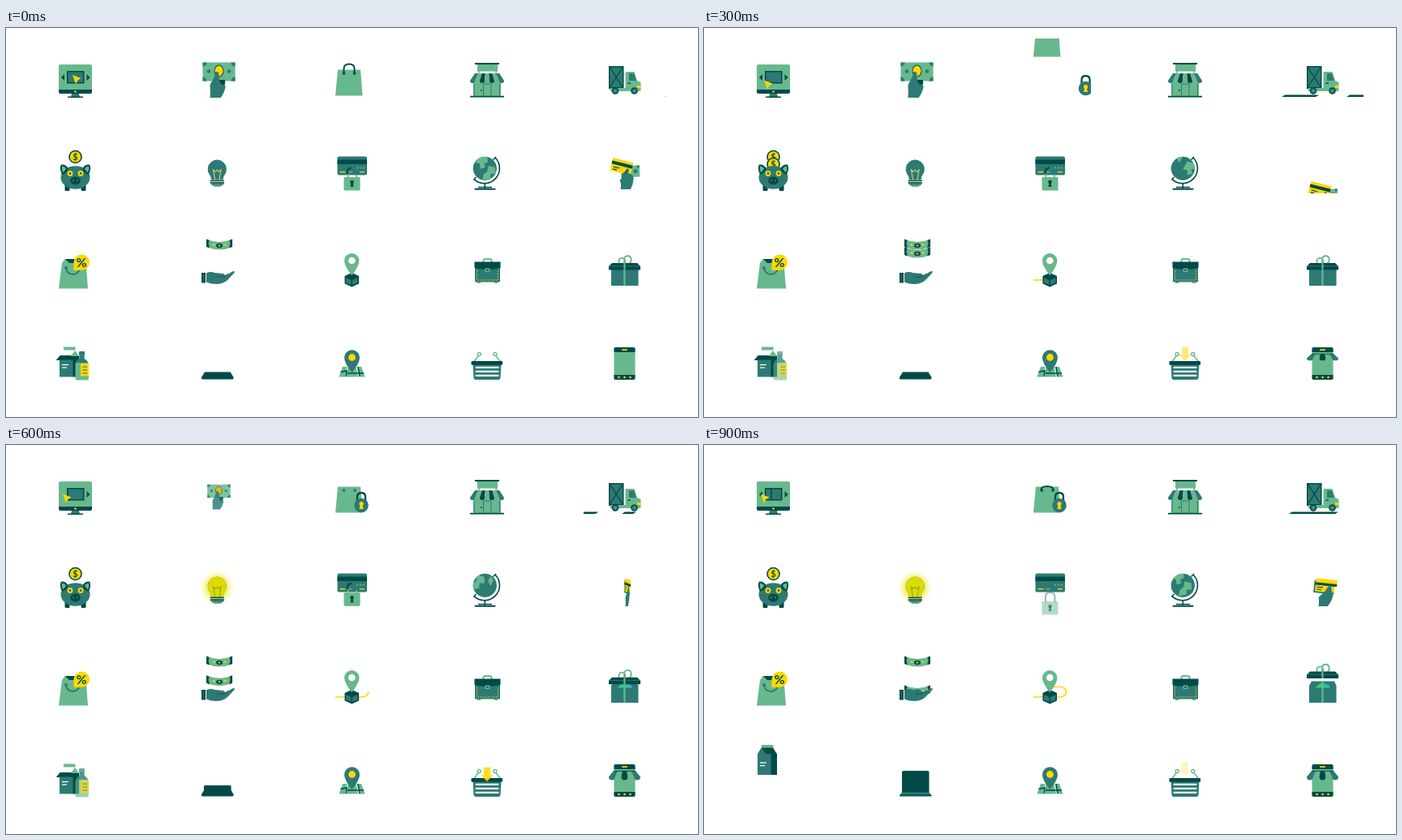
An HTML page with a canvas for the animation above (0.96 s loop, 853x480 px).

```html
<!DOCTYPE html>
<html>
<head>
<meta charset="utf-8">
<style>
html, body { margin: 0; width: 100%; height: 100%; overflow: hidden; background: #fff; }
canvas { display: block; }
</style>
</head>
<body>
<canvas id="stage" width="853" height="480"></canvas>
<script>
const c = document.getElementById('stage').getContext('2d');
const GREEN = '#68b88d', TEAL = '#2d7a74', DARK = '#004a48', YELLOW = '#ffd800', WHITE = '#fff';
const LOOP = 960, STEP = 60;
let t = 0;

// Piecewise linear value from time, value pairs
function key(...p) {
  if (t <= p[0]) return p[1];
  for (let i = 2; i < p.length; i += 2)
    if (t <= p[i]) return p[i - 1] + (p[i + 1] - p[i - 1]) * (t - p[i - 2]) / (p[i] - p[i - 2]);
  return p[p.length - 1];
}
function fill(color, d) { c.fillStyle = color; c.fill(new Path2D(d)); }
function line(color, w, d) { c.strokeStyle = color; c.lineWidth = w; c.stroke(new Path2D(d)); }
function rect(color, x, y, w, h, r = 0) {
  c.fillStyle = color;
  c.beginPath();
  c.roundRect(x, y, w, h, r);
  c.fill();
}
function oval(color, x, y, rx, ry = rx) {
  c.fillStyle = color;
  c.beginPath();
  c.ellipse(x, y, rx, ry, 0, 0, 7);
  c.fill();
}
function text(s, x, y, size, family) {
  c.font = `bold ${size}px ${family}, sans-serif`;
  c.textAlign = 'center';
  c.textBaseline = 'middle';
  c.fillStyle = DARK;
  c.fillText(s, x, y);
}
function group(draw, { dx = 0, dy = 0, alpha = 1, ox = 0, oy = 0, sx = 1, sy = 1, rot = 0 } = {}) {
  c.save();
  c.globalAlpha *= alpha;
  c.translate(ox + dx, oy + dy);
  c.rotate(rot);
  c.scale(sx, sy);
  c.translate(-ox, -oy);
  draw();
  c.restore();
}
function clipped(x, y, w, h, draw) {
  c.save();
  c.beginPath();
  c.rect(x, y, w, h);
  c.clip();
  draw();
  c.restore();
}

function monitor() {
  rect(GREEN, 65, 45, 41, 33, [2, 2, 0, 0]);
  rect(DARK, 65, 76, 41, 5, [0, 0, 2, 2]);
  oval(YELLOW, 85.5, 78.5, 1.2);
  fill(TEAL, 'M81 81H90L91 85H80Z');
  rect(DARK, 76, 84.5, 19, 1.5);
  rect(DARK, 75, 53, 21.5, 15.5);
  rect(TEAL, 76.5, 54.5, 18.5, 12.5);
  if (t >= 840) rect(DARK, key(840, 92, 900, 82), 54, 1.5, 13);
  if (t < 480 || t > 600) fill(DARK, 'M72 57V65L68 61Z');
  fill(DARK, 'M99.5 57V65L103.5 61Z');
  group(() => fill(YELLOW, 'M82 58L92.5 62L88.5 64.5L86 69Z'), {
    dx: key(0, 0, 120, 0, 300, -8, 420, -12, 900, -12),
    dy: key(0, 0, 120, 6.5, 300, 6.5, 420, 2.5)
  });
}

function payHand() {
  const s = key(480, 1, 540, .85, 720, .43, 840, 0);
  if (!s) return;
  group(() => {
    rect(GREEN, 242.5, 42.5, 40, 23);
    fill(TEAL, 'M242.5 42.5h5a5 5 0 0 1-5 5zM282.5 42.5v5a5 5 0 0 1-5-5zM242.5 65.5v-5a5 5 0 0 1 5 5zM282.5 65.5h-5a5 5 0 0 1 5-5z');
    oval(TEAL, 250, 53.5, 2.3);
    oval(TEAL, 275, 53.5, 2.3);
    oval(DARK, 262.5, 53, 6, 7.5);
    oval(YELLOW, 262.5, 53, 5, 6.5);
    fill(DARK, 'M261 64H270V69Q269 72 265 71Z');
    fill(TEAL, 'M257.5 58Q257 54 260 54Q262.5 54 262.5 58L263 65Q265 71 269 70Q271.5 71 270 75Q268 82 264.5 86H251.5Q252 78 251.5 73Q251 69 254.5 65Z');
  }, { ox: 262, oy: 64, sx: s, sy: s, alpha: key(540, 1, 720, .5) });
}

function lockedBag() {
  clipped(406, 13, 71, 72, () => {
    if (t < 240 || t >= 300) group(() => {
      fill(GREEN, 'M409 51.5H437L439.5 83.5H406Z');
      if (t >= 360) { oval(TEAL, 416.5, 56, 2); oval(TEAL, 430, 56, 2); }
    }, { dy: t < 240 ? 0 : key(300, -48, 420, -14, 540, 0) });
    if (t < 240) {
      line(DARK, 2, 'M416.5 57V50Q416.5 44.5 423 44.5Q429.5 44.5 429.5 50V57');
      oval(DARK, 416.5, 56, 1.8);
      oval(DARK, 429.5, 56, 1.8);
    }
    if (t >= 840) line(DARK, 2, 'M416 57Q414 51 423 51Q432 51 430 57');
    if (t >= 240) group(() => {
      line(DARK, 2.3, 'M433 71V64Q433 59 438 59Q443 59 443 64V71');
      oval(TEAL, 438, 74.5, 8.8);
      oval(YELLOW, 438, 72.5, 2.6);
      fill(YELLOW, 'M437 72H439L440.5 79H435.5Z');
    }, { dx: key(240, 45, 300, 32.5, 420, 9, 540, 0) });
  });
}

function store() {
  rect(DARK, 578, 43, 30, 2);
  rect(GREEN, 581, 45, 25, 8.5);
  line(TEAL, 1, 'M583 53V57M604 53V57');
  rect(GREEN, 576, 63, 34, 21);
  for (let i = 0; i < 7; i++) {
    const top = 578 + i * 4.3, low = 572 + i * 6;
    fill(i % 2 ? GREEN : i === 2 || i === 4 ? DARK : TEAL,
      `M${top} 56h4.3L${low + 6} 65a3 3 0 0 1-6 0Z`);
  }
  line(TEAL, 1, 'M588.5 84V69H598V84M577 69V83M608.5 69V83');
  oval(DARK, 586, 77, 1);
  rect(DARK, 572, 83.8, 42, 1.6);
}

function truck() {
  clipped(712, 40, 101, 46, () => {
    const road = (t0, x0, speed, len) => {
      const x = x0 - (t - t0) * speed;
      fill(DARK, `M${x} 84.9L${x + 4} 82.6H${x + len}L${x + len - 4} 84.9Z`);
    };
    road(120, 772, .333, 46);
    road(300, 792, .302, 29);
    road(540, 795, .6, 18);
    road(720, 802, .45, 61);
  });
  rect(DARK, 743, 47, 18.5, 28);
  rect(TEAL, 744.5, 48.5, 15.5, 24.5);
  line(DARK, 1.3, 'M744 48L760.5 73.5M760.5 48L744 73.5');
  rect(GREEN, 745, 74, 37, 4);
  fill(GREEN, 'M763.5 55Q763.5 54 765 54H774.5L778 65L782.5 67V77.5H763.5Z');
  fill(TEAL, 'M768 56H774L777 65H768Z');
  rect(DARK, 766, 67.5, 4, 1.3);
  rect(YELLOW, 778, 71, 4.5, 3);
  for (const x of [751, 774.5]) {
    oval(DARK, x, 77.5, 4.3);
    oval(TEAL, x, 77.5, 2.8);
    oval(GREEN, x, 77.5, 1);
  }
}

function coin(y) {
  oval(DARK, 85.5, y, 8.3);
  oval(YELLOW, 85.5, y, 6.7);
  text('$', 85.5, y + .7, 11, 'Lato');
}
function piggy() {
  coin(159);
  if (t > 120 && t < 500) coin(159 + key(120, 0, 300, 9, 420, 15.5, 480, 22));
  rect(DARK, 72.5, 193, 6, 8, 1.5);
  rect(DARK, 92.5, 193, 6, 8, 1.5);
  oval(TEAL, 85.5, 184.5, 18, 14.3);
  fill(DARK, 'M68 168.5Q75 168 76.5 174Q75 179 69.5 181Q65 174 68 168.5ZM103 168.5Q96 168 94.5 174Q96 179 101.5 181Q106 174 103 168.5Z');
  fill(GREEN, 'M69 170.5Q73.5 171 74 174L70 178.5Q68 174 69 170.5ZM102 170.5Q97.5 171 97 174L101 178.5Q103 174 102 170.5Z');
  for (const x of [79, 92]) { oval(YELLOW, x, 179.5, 3.4); oval(DARK, x, 179.5, 1.3); }
  oval(DARK, 85.5, 188.5, 6.3, 5);
  oval(TEAL, 83, 188, 1.2, 1.5);
  oval(TEAL, 88, 188, 1.2, 1.5);
}

function bulb() {
  const on = key(420, 0, 540, 1);
  if (on) group(() => {
    const glow = c.createRadialGradient(260, 176, 9, 260, 176, 22);
    glow.addColorStop(0, 'rgba(230,225,0,.85)');
    glow.addColorStop(.5, 'rgba(238,232,40,.35)');
    glow.addColorStop(1, 'rgba(250,245,120,0)');
    oval(glow, 260, 176, 22);
  }, { alpha: on });
  const glass = 'M253 187Q253 183 250.5 180.5A11.6 11.6 0 1 1 270 180.5Q267.5 183 267.5 187Z';
  fill(TEAL, glass);
  group(() => fill('#dedb00', glass), { alpha: on });
  line(on > .5 ? '#8fa31c' : '#d3d764', 1.1, 'M257.5 187L255.5 175L258 177.5L260.3 175L262.5 177.5L265 175L263 187');
  rect(DARK, 251.5, 187.5, 17.5, 1.7, 1);
  rect(DARK, 251.5, 190.3, 17.5, 1.7, 1);
  fill(GREEN, 'M254 193H267L264.5 196H256.5Z');
  rect(DARK, 253, 192.5, 15, 1.2);
}

function lockedCard() {
  rect(TEAL, 408.5, 158.5, 36.5, 23, 2);
  rect(DARK, 408.5, 162.5, 36.5, 5.5);
  rect(YELLOW, 411.5, 177, 7, 1.3);
  rect(GREEN, 421, 177, 6, 1.3);
  rect(YELLOW, 436, 177, 6, 1.3);
  for (let i = 0; i < 3; i++) oval(GREEN, 433 + i * 3.8, 172.5, 1.1);
  group(() => {
    if (t < 840) {
      line(GREEN, 2, 'M421.5 185V178M432 185V181');
      line(DARK, 2.2, 'M421 180V177Q421 173 426 172.5');
    } else line(TEAL, 2, 'M421 194V187Q421 182 426.7 182Q432.4 182 432.4 187V194');
    const y = t < 840 ? 184 : 193;
    rect(GREEN, 416.5, y, 20, 16.5, 1);
    oval(DARK, 426.5, y + 6, 2.3);
    fill(DARK, `M425.7 ${y + 6}h1.6l1.2 6h-4Z`);
  }, { dy: key(420, 0, 540, -2, 720, -1, 840, 0), alpha: key(600, 1, 720, .8, 900, .5) });
}

function globe() {
  line(DARK, 1.6, 'M603 160A18.6 18.6 0 0 1 577 186.6M600.5 162.5L604 159M579.5 184L576.3 187.5M590.3 191.5V198');
  c.save();
  c.beginPath();
  c.arc(590.3, 173.3, 14.6, 0, 7);
  c.clip();
  rect(TEAL, 575, 158, 31, 31);
  group(() => {
    const shift = t / LOOP * 44;
    for (let i = -1; i < 2; i++) group(() => {
      fill(GREEN, 'M576 163L585 160L589 165L586 169L590 172L586 177L582 172L577 174ZM592 168L600 165L605 171L600 175L603 180L596 187L593 180L595 175ZM606 160L612 162L613 170L607 167Z');
    }, { dx: i * 44 + shift });
  }, { ox: 590.3, oy: 173.3, rot: .6 });
  c.restore();
  rect(DARK, 582, 195.8, 17, 1.5);
  rect(DARK, 577.5, 197.7, 26, 2, 1);
}

function cards() {
  const turned = t >= 510;
  clipped(743, 158, 40, 46, () => group(() => {
    if (turned) {
      group(() => {
        rect(TEAL, 751, 168, 27, 15.5, 1);
        rect(YELLOW, 753, 165.5, 28, 6, 1);
        rect(YELLOW, 753, 173.5, 25, 8);
        rect(DARK, 753, 170.5, 28, 3);
        rect(DARK, 755, 175.5, 8, 1.2);
        rect(DARK, 755, 178.5, 6, 1.2);
      }, { ox: 766, oy: 174, rot: .1 });
      fill(TEAL, 'M771 173Q775 174 774 180L776 183Q776 191 769 199H757Q758 192 757 188L765 181Z');
    } else {
      group(() => {
        rect(GREEN, 758, 170, 23, 14);
        oval(TEAL, 776, 177, 2.5);
        rect(TEAL, 778, 170, 3, 3);
      }, { ox: 770, oy: 177, rot: -.05 });
      group(() => {
        rect(YELLOW, 746, 163, 26, 16, 1);
        rect(DARK, 746, 166.5, 26, 4);
        rect(DARK, 749, 173, 8, 1.2);
        rect(DARK, 749, 176, 5, 1.2);
      }, { ox: 759, oy: 171, rot: .25 });
      fill(TEAL, 'M759 185Q758 180 763 177L766 173Q769 174 767 179L770 180Q774 182 773.5 187Q773 193 770 199H757.5Q759 192 756.5 188Z');
      line(DARK, 1, 'M766 174L763 180');
    }
  }, turned
    ? { ox: 766, sx: key(540, .12, 720, .56, 900, .94) }
    : { dy: key(0, 0, 120, 10, 300, 29, 420, 39, 480, 48) }));
}

function saleBag() {
  fill(DARK, 'M73 285H86L90 290H70Z');
  fill(GREEN, 'M69 290L73 285L78 290H98.5L101 321.5H65Z');
  line(TEAL, 1.8, 'M74 296Q75 304 83 304Q90 303 91 296');
  oval(TEAL, 74, 296, 2);
  fill(YELLOW, 'M83.5 299V289A9.7 9.7 0 1 1 93 299Z');
  text('%', 93, 290, 16, 'Lato');
}

function bill() {
  fill(GREEN, 'M247 260.5Q263 267.5 279 260.5V270Q263 277 247 270Z');
  fill(DARK, 'M247 260.5L250.5 262L249.5 266L251 271.5L247 270ZM279 260.5L275.5 262L276.5 266L275 271.5L279 270Z');
  oval(DARK, 263, 268.5, 4, 2.7);
  oval(YELLOW, 263, 268.5, 1.4, 1);
  oval(YELLOW, 256, 267.5, 1.8, 1);
  oval(YELLOW, 270, 267.5, 1.8, 1);
}
function income() {
  bill();
  if (t >= 240) group(bill, { dy: key(240, 4, 300, 10, 420, 15.5, 540, 21, 720, 29.5, 900, 36) });
  rect(DARK, 241, 302, 5, 12.5);
  rect(TEAL, 242.8, 304, 1, 8.5);
  fill(TEAL, 'M247 302.5Q252 300 257 302L267 303Q271 304 269.5 306L279 300.5Q283 299 281.5 302L275 309Q269 316 260 316Q252 316 247 313.5Z');
  line(DARK, .8, 'M260 307H268L274 303.5');
}

function parcel() {
  c.setLineDash([t * .0735, 200]);
  if (t) line(YELLOW, 1.7, 'M406 311H438Q446.5 310.5 446.5 305Q446.5 298.5 439 298.5H428');
  c.setLineDash([]);
  fill(DARK, 'M426.3 302L435 306V315.5L426.3 319.5L417.5 315.5V306Z');
  fill(TEAL, 'M419 308L425.5 311V317L419 314.3ZM433.5 308L427 311V317L433.5 314.3Z');
  fill(GREEN, 'M426.3 305.5Q417 293.5 417 287.3A9.2 9.2 0 0 1 435.4 287.3Q435.4 293.5 426.3 305.5Z');
  oval(WHITE, 426.3, 287, 4.3);
}

function briefcase() {
  line(GREEN, 2, 'M588.5 289V287Q588.5 285 591 285H596Q598.5 285 598.5 287V289');
  rect(GREEN, 581, 312, 4, 3);
  rect(GREEN, 602, 312, 4, 3);
  rect(TEAL, 578, 290, 31, 23.5, 1);
  fill(DARK, 'M577.5 288.5H609.5V296Q602 298 593.5 298Q585 298 577.5 296Z');
  c.setLineDash([1.5, 1.7]);
  line(YELLOW, .9, 'M580.5 299V311H606.5V299');
  c.setLineDash([]);
  rect(GREEN, 590.5, 296.5, 6, 4.5, 1);
  rect(DARK, 592, 298, 3, 1.5);
}

function gift() {
  const lift = key(480, 0, 540, -1.5, 720, -7, 900, -10.5);
  fill(TEAL, 'M749 291.5H777L779.5 297V318H746V297Z');
  if (lift < -3) {
    fill('#2fd07a', 'M754 299.5Q762 288 770 299.5Z');
    fill('#35b7c0', 'M763 299.5Q768 291 772 299.5Z');
  }
  rect(GREEN, 761.3, 292, 2.2, 26);
  group(() => {
    line(GREEN, 1.8, 'M755.5 291V287A4 4 0 0 1 763.3 287V291M762 291V285A4.4 4.4 0 0 1 770.7 285Q771 289 768 291');
    fill(DARK, 'M747 290H778L782 294V298.5H743V294Z');
    line(TEAL, 1, 'M744 293.7H781');
    rect(GREEN, 761.3, 290, 2.2, 8.5);
  }, { dy: lift });
}

function groceries() {
  const dropping = t >= 840;
  group(() => {
    rect(GREEN, 71, 393.5, 14.5, 4);
    if (dropping) {
      fill(DARK, 'M71 397H85L90 405H66Z');
      fill(TEAL, 'M71 397L76 405H66Z');
    } else fill(DARK, 'M67 404H84L81 410H62Z');
    rect(TEAL, 66, 404.5, 17.5, 26);
    rect(DARK, 82.5, 404.5, 7.5, 26);
    if (!dropping) fill(DARK, 'M67 404H84V409.5H62Z');
    rect(WHITE, 69, 415, 8, 1.2);
    rect(WHITE, 69, 418.5, 6, 1.2);
  }, { dy: dropping ? key(840, -40, 900, -23.5) : 0 });
  if (!dropping) {
    fill(GREEN, 'M85 398L90 405H80Z');
    group(() => {
      rect(TEAL, 90, 399, 7, 5, 1);
      fill(GREEN, 'M90.5 403.5H96.5V408Q102 411 102 416V432Q102 434.5 100 434.5H87.5Q85.5 434.5 85.5 432V416Q85.5 411 90.5 408Z');
      fill(TEAL, 'M90.5 403.5H96.5V408Q100 410 101 413H86.5Q88 410 90.5 408Z');
      rect(YELLOW, 92, 414, 10, 15.5);
      for (let i = 0; i < 3; i++) rect(TEAL, 94.5, 417.5 + i * 4, 5.5, 1.1);
    }, { alpha: key(120, 1, 300, .6, 420, .48, 540, .5, 720, 1) });
  }
}

function laptop() {
  const open = key(540, 0, 720, 1);
  if (open) group(() => rect(DARK, 244, 402, 33.5, 27, [2, 2, 0, 0]), { oy: 429, sy: open });
  if (open < .5) fill(DARK, 'M245 424.5H276.5L280.5 431V432.5Q280 433.5 279 433.5H242.5Q241 433.5 241 432.5V431Z');
  else {
    fill(TEAL, 'M244 428.5H277.5L280.5 432.5H241Z');
    rect(DARK, 241, 431.5, 39.5, 2, 1);
  }
}

function map() {
  fill(GREEN, 'M415 418H438L442.5 430.5H410.5Z');
  line(WHITE, 1, 'M421 418L418.5 430.5M432 418L434.5 430.5');
  line(DARK, 1.4, 'M412.5 424.5L420 423L419 430M421 426H441M434 418L436 430');
  fill(TEAL, 'M426.5 425Q417 413.5 417 406.7A9.5 9.5 0 0 1 436 406.7Q436 413.5 426.5 425Z');
  oval(YELLOW, 426.5, 406.5, 4.4);
}

function basket() {
  line(GREEN, 1.5, 'M577 411.5L582.5 404M609.5 411.5L603.5 404');
  for (const x of [583.2, 602.8]) { oval(GREEN, x, 402.5, 2.7); oval(WHITE, x, 402.5, 1.3); }
  fill(TEAL, 'M575.5 414H610.5L609.5 432Q609 434 607 434H579Q577 434 576.5 432Z');
  for (let i = 0; i < 3; i++) rect(WHITE, 578.5, 417.8 + i * 5, 29, 2.2, 1);
  rect(DARK, 573.5, 411, 38.5, 4.8, 1);
  group(() => fill(YELLOW, 'M589 391H597V400.5H600.5L593 408.5L585.5 400.5H589Z'), {
    dy: t >= 840 ? 0 : key(120, 0, 300, 2.5, 420, 4, 540, 6, 720, 8.5),
    alpha: key(60, 0, 120, .22, 300, .55, 420, .68, 540, .82, 720, 1, 780, 1, 840, .15, 900, .25)
  });
}

function phone() {
  rect(GREEN, 749.5, 394, 26, 40, 2);
  rect(DARK, 749.5, 394, 26, 6, [2, 2, 0, 0]);
  rect(YELLOW, 759, 396.3, 7, 1.6, 1);
  rect(DARK, 749.5, 428, 26, 6, [0, 0, 2, 2]);
  for (let i = 0; i < 3; i++) oval(YELLOW, 755.5 + i * 7, 431, 1.3);
  const drop = key(60, 0, 120, .22, 300, .72, 420, 1);
  if (drop) group(() => {
    for (let i = 0; i < 5; i++) {
      const top = 749 + i * 5.4, low = 743 + i * 7.8;
      fill(i % 2 ? (drop < .3 ? TEAL : GREEN) : i === 2 ? DARK : TEAL,
        `M${top} 402h5.4L${low + 7.8} 409.5a3.9 4 0 0 1-7.8 0Z`);
    }
    line(DARK, 1, 'M749 402.3H776');
  }, { oy: 402, sy: drop });
}

const icons = [
  monitor, payHand, lockedBag, store, truck,
  piggy, bulb, lockedCard, globe, cards,
  saleBag, income, parcel, briefcase, gift,
  groceries, laptop, map, basket, phone
];
const start = performance.now();
function frame() {
  t = Math.floor((performance.now() - start) / STEP) * STEP % LOOP;
  rect(WHITE, 0, 0, 853, 480);
  icons.forEach(draw => draw());
  requestAnimationFrame(frame);
}
frame();
</script>
</body>
</html>
```
